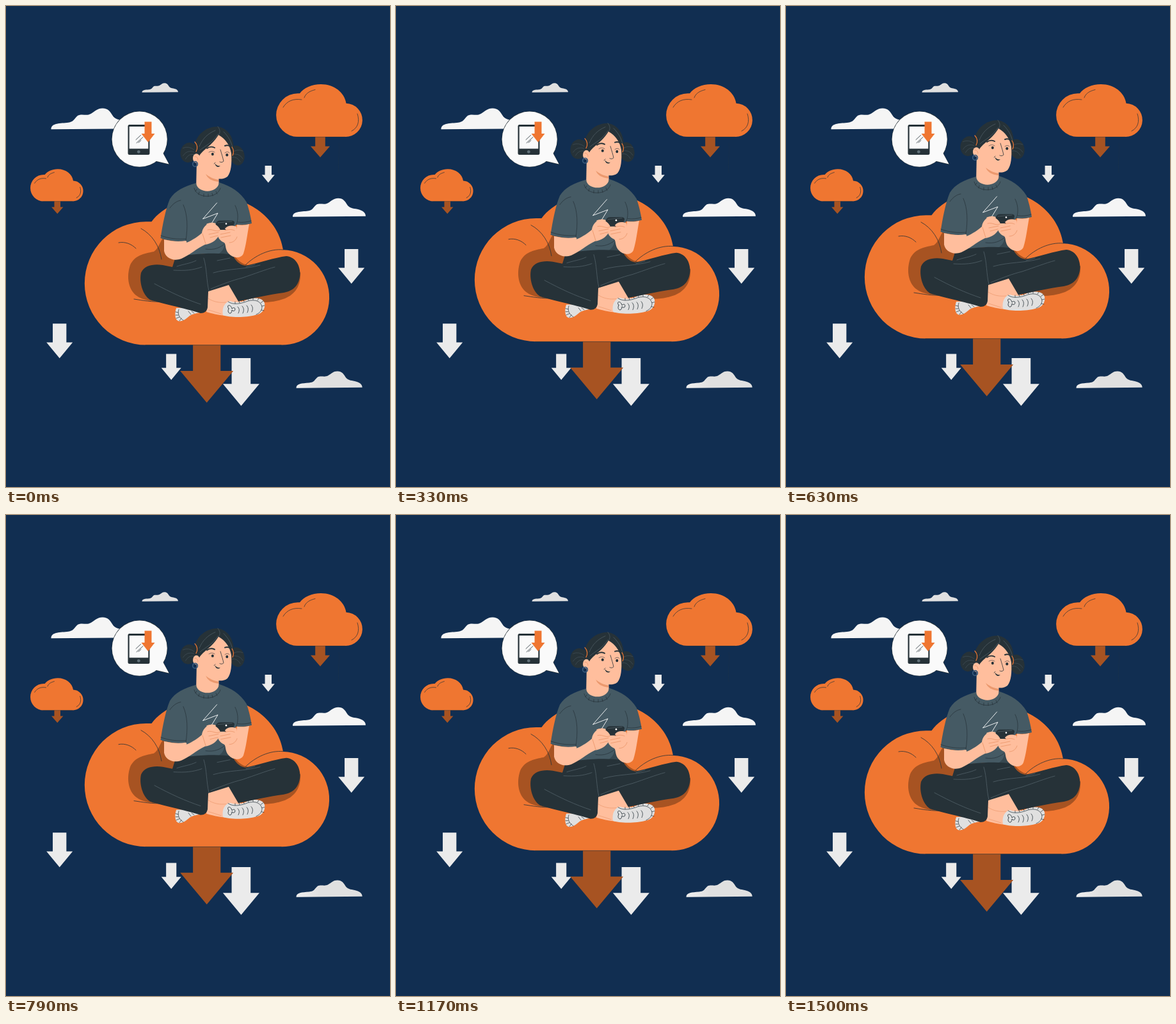
Recreate the animation shown at these times as an HTML page with a canvas. Size 600 by 750 pixels, loop 1.54 s.

```html
<!DOCTYPE html>
<html lang="en">
<head>
<meta charset="utf-8">
<title>Cloud download</title>
<style>
html, body { margin: 0; width: 100%; height: 100%; overflow: hidden; background: #112e51; }
canvas { display: block; width: 600px; height: 750px; }
</style>
</head>
<body>
<canvas id="stage" width="600" height="750"></canvas>
<script>
const ctx = document.getElementById('stage').getContext('2d');
const LOOP = 1540, STEP = 1000 / 24, LAST = 36, RISE = 12;
const NAVY = '#112e51', ORANGE = '#ef7631', BROWN = '#a75322', DARK = '#263238',
  SHIRT = '#455a64', SKIN = '#ffbe9d', SHADE = '#eb996e', PALE = '#f5f5f5',
  GREY = '#ebebeb', SHOE = '#e0e0e0';

function fill(path, color) {
  ctx.fillStyle = color;
  ctx.fill(new Path2D(path));
}

function line(path, color = DARK, width = 0.8) {
  ctx.strokeStyle = color;
  ctx.lineWidth = width;
  ctx.stroke(new Path2D(path));
}

function dot(x, y, rx, ry, color, turn = 0) {
  ctx.fillStyle = color;
  ctx.beginPath();
  ctx.ellipse(x, y, rx, ry, turn, 0, Math.PI * 2);
  ctx.fill();
}

function box(x, y, w, h, r, color) {
  ctx.fillStyle = color;
  ctx.beginPath();
  ctx.roundRect(x, y, w, h, r);
  ctx.fill();
}

function placed(x, y, scale, draw) {
  ctx.save();
  ctx.translate(x, y);
  ctx.scale(scale, scale);
  draw();
  ctx.restore();
}

function arrow(x, top, w, h, color = GREY, neck = 0.54) {
  const half = w / 2, stem = w * 0.26, y = top + h * neck;
  fill(`M${x - stem} ${top}H${x + stem}V${y}H${x + half}L${x} ${top + h}L${x - half} ${y}H${x - stem}Z`, color);
}

const PUFF = 'M34 82A33.9 33.9 0 0 1 34 14.2H37C43 6 56 0 70 0C91 0 107 13 109.5 29.7A26 26 0 0 1 108 82Z';

function wisp(x, y, scale, color) {
  placed(x, y, scale, () => fill('M0 29C0 21 10 21 22 20C32 19 31 15 37 10C43 7 49 11 55 7.5C61 4 64 0 71 0C79 0 82 5 85 10C88 15 94 16 101 17C109 19 114 22 114 28Z', color));
}

function orangeCloud(x, y, scale) {
  placed(x, y, scale, () => {
    line('M98 92C100 106 96 120 98 138', '#17304c', 0.8);
    arrow(69, 81, 30, 33, BROWN, 0.48);
    fill(PUFF, ORANGE);
    const w = 0.7 / scale;
    line('M33 82.2H108', DARK, w * 0.6);
    line('M11 36C17 26 27 22 40 24M44 21C46 15 51 11 61 8.5M127 46C131 58 128 68 118 73', DARK, w);
  });
}

function bubble() {
  dot(208.7, 207.7, 43.7, 43.7, DARK);
  fill('M245 228L255.5 247.5L231 242Z', DARK);
  dot(208.7, 207.7, 43.1, 43.1, '#fafafa');
  fill('M244 227L254.6 246.6L231 241Z', '#fafafa');
  box(190.5, 185, 34, 47, 2.5, DARK);
  box(192.7, 188, 29.6, 34.5, 0.5, '#fafafa');
  dot(207.3, 227.3, 2.4, 2.4, '#607078');
  line('M203 208.5L210.5 201.5M204 213.5L214 204.5M207 213L211 209.5', DARK, 0.8);
  arrow(222, 180.5, 21, 32, ORANGE, 0.58);
}

function scenery() {
  ctx.fillStyle = NAVY;
  ctx.fillRect(0, 0, 600, 750);
  wisp(212.5, 120.3, 0.495, SHOE);
  wisp(70.5, 159.5, 1.13, PALE);
  wisp(448, 299.7, 1, PALE);
  const fade = ctx.createLinearGradient(0, 0, 40, 0);
  fade.addColorStop(0, '#f0f0f0');
  fade.addColorStop(1, SHOE);
  wisp(453.5, 569.5, 0.905, fade);
  bubble();
  orangeCloud(422, 122, 1);
  orangeCloud(38, 254.3, 0.612);
  arrow(409.8, 249, 20, 26.5);
  arrow(539.7, 379, 41, 54);
  arrow(83.7, 495.3, 41, 54);
  arrow(258.2, 542.5, 31, 40.5);
  arrow(367.4, 549, 57, 74.5);
}

function seat() {
  arrow(313.7, 527, 83, 91.5, BROWN, 0.46);
  placed(122.5, 296, 2.836, () => fill(PUFF, ORANGE));
  line('M218 528.7H430', DARK, 0.6);
  fill('M247 360C240 367 239 378 231 383C215 386 201 389 194 404C188 422 191 441 203 451C214 460 232 461 246 461L300 440L268 392Z', BROWN);
  fill('M352 382C360 396 368 402 378 404L366 412L345 400Z', BROWN);
  fill('M460 415C461 436 452 449 436 456C422 461 408 463 392 462L360 455L420 430Z', BROWN);
  line('M176 369C186 367 196 371 203 378M211 347C228 356 240 374 243 395M374 404C389 389 412 378 433 380M200 457C214 459 228 462 246 461');
}

function shoes() {
  fill('M266 471C263 480 264 490 270 491.5C277 492 281 488 287 483C292 480 298 479 303 478L282 470Z', SHOE);
  line('M270 473C267 481 272 487 277 490M265 477L269 478M265 482L269 482M266 487L271 485M271 491L274 487', DARK, 0.7);
  line('M285 476L289 481M290 476L294 479', DARK, 0.7);
  fill('M316 442L349 432L367 461C350 463 344 470 343 483C332 482 320 479 313 477Z', SKIN);
  line('M316 456C325 462 335 463 344 462M317 474L336 480', SHADE, 0.7);
  fill('M339 482C337 470 342 462 350 460C360 464 371 461 378 457C390 454 401 455 404 463C406 473 399 481 389 482C376 486 348 486 339 482Z', SHOE);
  line('M347 461C355 467 368 464 378 460C389 457 398 460 400 469C400 475 396 479 391 481', DARK, 0.7);
  line('M358 464V461M365 463L364 460M372 461L371 458M379 459L378 456M386 458V455M393 459L395 456M398 463L402 460M400 468L404 467M399 474L403 475', DARK, 0.7);
  line('M348 472C343 465 352 465 353 472C360 466 359 480 353 474C353 483 344 479 348 472', DARK, 0.9);
  line('M362 469C365 472 365 475 363 479M369 468C372 471 372 475 370 479M376 467C379 470 379 474 377 478M383 466C386 469 386 473 384 477', DARK, 0.8);
}

function trousers() {
  fill('M265 391C285 387 330 383 354 388C358 396 363 403 374 405C395 401 420 392 438 390C450 391 459 401 459.5 417C459 433 451 444 434 447C410 450 385 456 363 460.5L348 435L316 445L315 470C314 476 310 479 304 479C278 471 244 464 225 458C213 450 208 430 211 416C216 404 231 402 245 404L260 407Z', DARK);
  line('M309 393C314 409 313 428 317 444M232 433C258 447 280 457 304 465M267 406C279 402 286 402 297 397M262 412C280 413 292 412 306 407M324 416C348 409 373 411 397 404M320 441C340 433 353 428 369 424C390 417 405 411 420 407M389 403L375 407M330 397L350 393', '#526169', 0.8);
}

function body() {
  fill('M298 240L332 255L333 289C325 295 305 295 297 288Z', SKIN);
  fill('M312 261C318 267 325 270 332 271L332 274C322 273 314 269 312 261Z', SHADE);
  fill('M297 276C279 281 264 288 256 301C249 318 245 340 241.5 362C252 366 268 368 281 367L265 393C290 386 330 384 357 389C347 373 349 351 360 341C368 342 377 341 384 339C382 326 379 315 376 306C366 290 352 281 333 275C331 293 299 293 297 276Z', SHIRT);
  line('M294 284C298 301 330 301 335 284M298 286L296 289M302 290L301 294M309 293V297M316 293V297M322 292L323 296M328 289L330 293', DARK, 0.7);
  line('M277 310C284 326 284 345 281 366M256 315C261 308 267 304 273 303M360 341C364 330 362 319 358 311M242 358C255 363 269 364 281 363M362 337C370 338 377 337 383 335', DARK, 0.7);
  line('M263 373C255 384 264 391 274 384M312 379C326 381 334 377 343 370', DARK, 0.7);
  fill('M329 388C337 385 341 378 342 370L350 382L354 388Z', '#374850');
  line('M329.5 307L307.5 332L331 323L320 341', '#fff', 0.9);
}

function arms() {
  fill('M247 364C258 367 270 368 281 366C283 367 282 369 282 369C292 365 300 359 306 354C307 346 313 339 320 338C326 337 331 341 334 344L332 359C328 366 320 371 311 372C298 378 286 389 274 394C260 399 249 392 247 382Z', SKIN);
  fill('M361 341C368 342 374 342 380 340C377 356 375 374 371 386C367 395 354 393 348 386C342 380 344 372 341 369C334 366 329 360 331 351L345 344L360 349Z', SKIN);
  fill('M328 339C330 335 332 334.5 336 334.5H353C357 335 358 337 356 341L354 347C353 349 351 349 348 349H329C325 348 326 345 328 339Z', DARK);
  line('M331 338L353 336', '#56666e', 0.7);
  dot(344, 339.5, 1.3, 1.3, '#fff');
  fill('M313 340C321 336 330 341 333 346C337 350 333 354 328 351L319 347Z', SKIN);
  fill('M342 347C347 341 355 342 360 344C362 355 359 366 350 369C341 370 333 363 331 355C339 353 344 354 350 351C346 350 344 350 342 347Z', SKIN);
  line('M315 349C323 347 327 353 334 350M317 356L332 353M319 361L331 358M335 356L350 353M336 361L351 358M342 350C348 348 353 348 357 350M307 355L312 371M361 360C359 366 354 369 349 369', SHADE, 0.9);
}

function bun(x, y, rx, ry, side) {
  dot(x, y, rx, ry, DARK, side * 0.2);
  line(`M${x - side * 9} ${y - 7}Q${x} ${y - 11} ${x + side * 9} ${y - 4}M${x - side * 9} ${y + 5}Q${x - side * 3} ${y - 5} ${x + side * 9} ${y - 1}M${x - side * 5} ${y + 10}Q${x} ${y + 1} ${x + side * 8} ${y + 3}`, '#435159', 0.7);
}

function head() {
  bun(285.5, 228.5, 13, 15.5, 1);
  bun(361, 233, 11.5, 15.5, -1);
  fill('M294 219C297 200 313 188 331 188C347 191 356 204 356 225L350 242L303 246L294 232Z', DARK);
  fill('M301 238C302 226 320 221 332 201C343 207 350 217 352 230C353 245 352 259 346 266C338 273 319 269 311 261L298 254Z', SKIN);
  dot(297.5, 237.5, 5.5, 7.3, SKIN);
  line('M331 188C335 193 335 198 332 201M327 194C315 199 307 207 302 219M331 200C323 213 311 218 303 225M340 196C347 203 352 211 354 221', '#526169', 0.7);
  line('M295 212C299 216 300 222 297 227M353 220C356 224 356 229 354 233', ORANGE, 1.2);
  line('M295 235C298 234 300 237 300 240', SHADE, 0.8);
  ctx.strokeStyle = '#38597a';
  ctx.lineWidth = 1.8;
  ctx.beginPath();
  ctx.arc(295.5, 246.5, 3.8, 0, Math.PI * 2);
  ctx.stroke();
  dot(322.8, 231, 2, 2.2, DARK);
  dot(345.3, 232.3, 2, 2.2, DARK);
  line('M314 222C318 219 322 219 326 221M342 218C345 217 348 217 350 219', DARK, 1.9);
  line('M317 228C320 226 323 226 326 228M342 229C345 227 347 227 349 229', DARK, 0.6);
  line('M335 224C337 231 339 237 340 242C338 244 336 244 334 243');
  fill('M326 245C328 248 331 250 335 249C332 252 328 252 326 245Z', DARK);
  line('M325 246L327 244', DARK, 0.7);
}

function draw(time) {
  const frame = Math.min(LAST, Math.floor((time % LOOP + 5) / STEP));
  const lift = RISE * (1 - Math.abs(frame * 2 / LAST - 1));
  scenery();
  placed(0, -lift, 1, () => {
    seat();
    body();
    shoes();
    trousers();
    arms();
    head();
  });
}

ctx.lineCap = ctx.lineJoin = 'round';
const start = performance.now();
function tick(now) {
  draw(Math.max(0, now - start));
  requestAnimationFrame(tick);
}
draw(0);
requestAnimationFrame(tick);
</script>
</body>
</html>
```
